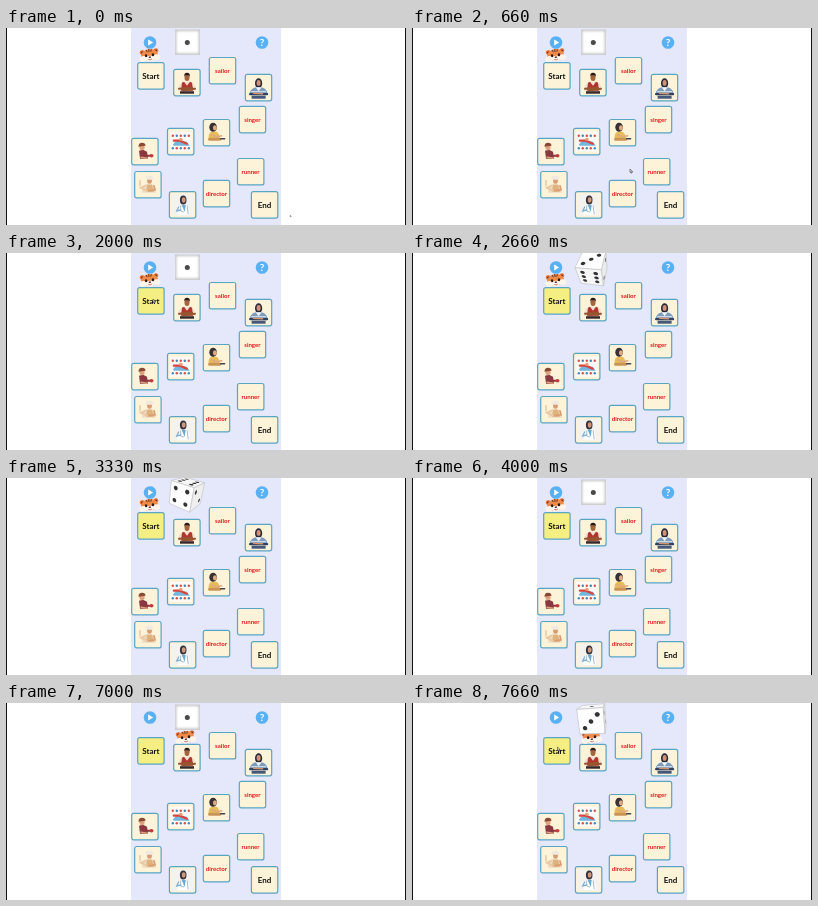
Write an HTML page that moves like this. It is 400x197 px and loops after 8 s.

```html
<!DOCTYPE html>
<html lang="en">
<head>
<meta charset="utf-8">
<title>Jobs board game</title>
<style>
html, body { margin: 0; width: 100%; height: 100%; overflow: hidden; background: #fff; }
svg { display: block; width: 400px; height: 197px; }
text { font: 700 6.1px Lato, sans-serif; text-anchor: middle; fill: #e3181c; }
text.big { font-size: 8px; fill: #111; }
</style>
</head>
<body>
<svg viewBox="0 0 400 197">
  <defs>
    <filter id="soft" x="-20%" y="-20%" width="140%" height="140%"><feGaussianBlur stdDeviation=".8"/></filter>
  </defs>
  <path d="M0 0h1v197h-1zM399 0h1v197h-1z" fill="#111"/>
  <rect x="125" width="150" height="197" fill="#e5e7fb"/>
  <g fill="#58b0f5"><circle cx="144" cy="14.5" r="6.3"/><circle cx="256" cy="14.5" r="6.3"/></g>
  <path d="M142.2 11.6l5 2.9-5 2.9z" fill="#fff"/>
  <text class="big" x="256" y="18" style="font-size:10px;fill:#fff">?</text>
  <g id="board"></g>
  <g id="tiger"></g>
  <g id="restDie">
    <rect x="169" y="1.5" width="25" height="25.5" fill="#c8c8c8"/>
    <rect x="170.5" y="3.2" width="22" height="22" fill="#fff" filter="url(#soft)"/>
    <circle cx="181.3" cy="14.4" r="2.5" fill="#4a4a4a"/>
  </g>
  <g id="rollingDie" stroke-linejoin="round"></g>
  <path id="cursor" d="M0 0v5l1.2-1 .9 2 .9-.4-.8-1.9h1.6z" fill="#fff" stroke="#111" stroke-width=".7"/>
</svg>
<script>
const $ = id => document.getElementById(id);
const oval = (x, y, rx, ry, fill) => `<ellipse cx="${x}" cy="${y}" rx="${rx}" ry="${ry}" fill="${fill}"/>`;
const shape = (d, fill) => `<path d="${d}" fill="${fill}"/>`;
const line = (d, color, width = 1) =>
  `<path d="${d}" fill="none" stroke="${color}" stroke-width="${width}" stroke-linecap="round"/>`;
const word = (label, big) => `<text class="${big ? 'big' : ''}" x="13.8" y="${big ? 17 : 16.2}">${label}</text>`;

const waiter =
  shape('M5 22q0-8 6-9h6q6 1 6 9z', '#f0e2d2') +
  shape('M9 14l2-1 3 4 3-4 2 1 1 8H8z', '#b2362e') +
  oval(14, 8.8, 2.5, 3.6, '#a4643d') + shape('M11.3 8q-.5-4 2.7-4t3 4l-1-1.5h-4z', '#2b1b18') +
  line('M6 20l13-1M22 20l-12 1.5', '#96552f', 2) + shape('M7 22.5h14v2.5H7z', '#37282b');

const sailor =
  oval(14, 9.5, 3.6, 5, '#2a2b38') + oval(14, 9.2, 2, 2.9, '#cf9370') +
  shape('M5 21q0-6 6-7.5h6q6 1.500 6 7.5z', '#7d9cbc') + shape('M11 13.500h6l-3 4z', '#f0f3f8') +
  line('M7 18h14', '#dde8f3') + line('M5.5 20.500h17', '#33435f', 2.2) +
  line('M9 19.500l9 .5', '#cf9370', 1.4) + shape('M7 22h14v3H7z', '#46587a');

const guitarist =
  oval(10.5, 8.5, 3.8, 4.6, '#383035') + oval(12.3, 9, 2, 2.6, '#dfa982') +
  shape('M6 20q-.5-7 4-7h4q3 2 3 7z', '#e8bd58') + line('M7 20.500h10', '#c99455', 3) +
  line('M9 16l5 2 5-1', '#dfa982', 1.6) + line('M18 20h4', '#42454f', 1.5);

const swimmers =
  shape('M3 4h22v20H3z', '#fdfaf6') +
  [5, 9, 13, 17, 21].map((x, i) => oval(x + 1, 8, 1.2, 1.2, i % 2 ? '#457eb0' : '#d95145') +
    oval(x + 1, 20.500, 1.2, 1.3, i % 2 ? '#db5045' : '#4a89b9')).join('') +
  shape('M6 17q4-6 8-4l6 1 3 4H7z', '#74b6dc') + line('M7 13l6 0 7 3', '#d7463c', 2.2) +
  oval(14, 11.5, 1.8, 1.5, '#e8a176');

const painter =
  shape('M8 13l4-1 4 2 1 7H9z', '#8c3840') + oval(11, 9.5, 2.6, 3, '#e0a27c') +
  shape('M7.500 9q0-4 3.500-4 3.500 0 3.500 3l-4 .5z', '#8a4934') + line('M12 14l4 4 4 0', '#8c3840', 2) +
  oval(20.500, 18, 2, 1.8, '#c63a3a') + line('M10 19.500l6 1', '#e0a27c', 1.5);

const baker =
  shape('M8 22q0-8 5-9h4q5 2 5 9z', '#ecdcc4') + oval(15.500, 10, 2.4, 3, '#d99b70') +
  shape('M12 9q-2-4 3-4 5-1 4 4z', '#f0e9df') + shape('M13 14h5l2 7h-8z', '#dfb27e') +
  line('M11 15l-4 2 6 3', '#ecc9a4', 2) + line('M20 15l1 4-6 1', '#d99b70', 1.6) +
  line('M6 10v5', '#e6c9a8', 1.5);

const doctor =
  shape('M3 3.500h21.500v21H3z', '#f3f2ef') + oval(14.500, 9, 3.3, 4.6, '#33323c') +
  oval(15, 9, 1.9, 2.8, '#d09676') + shape('M9 24q-.5-9 4-10h4q4.500 2 4 10z', '#fff') +
  shape('M13 14h4l-1 7z', '#6ba9cf') + line('M12 15l0 5 3 1M18.500 15l1 8', '#91a9bd', .8) +
  line('M10 16l-2 4 4-1', '#7fb0d2', 1.3);

const tiles = [
  [131, 34, word('Start', true)], [167, 40.7, waiter], [202.600, 28.800, word('sailor')],
  [238.600, 45.700, sailor], [232.600, 77.700, word('singer')], [196.600, 90.800, guitarist],
  [160.800, 99.700, swimmers], [125, 109.700, painter], [128, 142.800, baker],
  [162.700, 163, doctor], [196.600, 151.700, word('director')], [230.800, 129.800, word('runner')],
  [244.700, 163, word('End', true)]
];
$('board').innerHTML = tiles.map(([x, y, content]) => `<g transform="translate(${x} ${y})">
  <rect x=".7" y=".7" width="26.4" height="26.4" rx="2" fill="#fdf3d8" stroke="#58a5c4" stroke-width="1.200"/>
  ${content}</g>`).join('');
const startTile = $('board').querySelector('rect');

$('tiger').innerHTML =
  oval(-7, -3.500, 2.4, 2.4, '#e8743a') + oval(7, -3.500, 2.4, 2.4, '#e8743a') +
  oval(-7, -3.500, 1.1, 1.1, '#6a3026') + oval(7, -3.500, 1.1, 1.1, '#6a3026') +
  oval(0, 0, 8.500, 6, '#f08a48') + oval(-6.500, 3, 4, 2.8, '#fff4e8') + oval(6.500, 3, 4, 2.8, '#fff4e8') +
  oval(0, 3.600, 4, 2.800, '#fffaf2') +
  line('M0-5.500v2M-2.500-5l.6 1.500M2.500-5l-.6 1.500', '#5d3022', .9) +
  oval(-3.500, .2, 1.200, 1.500, '#2a1a18') + oval(3.500, .2, 1.200, 1.500, '#2a1a18') +
  oval(0, 2.200, 1.200, .8, '#51262a') + line('M-1.500 4.500q1.500 1.200 3 0', '#c4574c', .8);

// Each face: pip count, outward normal, two in-plane axes.
const faces = [
  [1, [0, 0, 1], [1, 0, 0], [0, 1, 0]], [6, [0, 0, -1], [1, 0, 0], [0, 1, 0]],
  [3, [0, 1, 0], [1, 0, 0], [0, 0, 1]], [4, [0, -1, 0], [1, 0, 0], [0, 0, 1]],
  [2, [1, 0, 0], [0, 1, 0], [0, 0, 1]], [5, [-1, 0, 0], [0, 1, 0], [0, 0, 1]]
];
const pips = n => [
  ...(n % 2 ? [[0, 0]] : []),
  ...(n > 1 ? [[-.52, -.52], [.52, .52]] : []),
  ...(n > 3 ? [[.52, -.52], [-.52, .52]] : []),
  ...(n > 5 ? [[-.52, 0], [.52, 0]] : [])
];
const turn = (p, q, degrees) => {
  const c = Math.cos(degrees * Math.PI / 180), s = Math.sin(degrees * Math.PI / 180);
  return [p * c - q * s, p * s + q * c];
};

function drawDie(k) {
  const rotate = ([x, y, z]) => {
    [y, z] = turn(y, z, 75 + 57 * k);
    [z, x] = turn(z, x, -10 - 5 * k);
    [x, y] = turn(x, y, -3 + 7.5 * k);
    return [x, y, z];
  };
  const project = p => {
    const [x, y, z] = rotate(p), scale = 11.8 * 9 / (9 - z);
    return `${(181 + x * scale).toFixed(2)} ${(15 + y * scale).toFixed(2)}`;
  };
  const outline = points => 'M' + points.map(project).join('L') + 'z';
  $('rollingDie').innerHTML = faces.map(([count, n, u, v]) => {
    const [nx, ny, nz] = rotate(n);
    if (nz < .12) return '';
    const at = (a, b) => n.map((c, i) => c + u[i] * a + v[i] * b);
    const gray = Math.min(255, Math.round(236 + 20 * nz - 5 * ny - 5 * nx));
    const dots = pips(count).map(([a, b]) => shape(outline(Array.from({ length: 14 }, (_, i) =>
      at(a + .18 * Math.cos(i * Math.PI / 7), b + .18 * Math.sin(i * Math.PI / 7)))), '#333'));
    return `<path d="${outline([at(-1, -1), at(1, -1), at(1, 1), at(-1, 1)])}"
      fill="rgb(${gray},${gray},${gray})" stroke="#c5c5c9" stroke-width=".7"/>` + dots.join('');
  }).join('');
}

const cursorPath = [[284, 187], [269, 185], [218, 141], [149, 51], [148, 49], [147, 48], [147, 46]];
let shown = -1;

function render(now) {
  // The picture advances three times a second.
  const step = Math.floor((now % 8000 + 7) * 3 / 1000) % 24;
  if (step !== shown) {
    shown = step;
    const roll = step >= 23 ? step - 23 : step - 7;
    const rolling = roll >= 0 && roll < 4;
    const moved = step >= 13;
    const [x, y] = step < 7 ? cursorPath[step] : [145.5, 44];
    const idle = step >= 7 && step < 22;
    startTile.setAttribute('fill', step >= 3 ? '#f5ef83' : '#fdf3d8');
    $('tiger').setAttribute('transform', `translate(${moved ? '179.5 34' : '143.5 27'}) rotate(-8)`);
    $('restDie').style.display = rolling ? 'none' : '';
    $('rollingDie').style.display = rolling ? '' : 'none';
    $('cursor').style.display = idle ? 'none' : '';
    $('cursor').setAttribute('transform', `translate(${x} ${y}) scale(${step ? .7 : .35})`);
    if (rolling) drawDie(roll);
  }
  requestAnimationFrame(render);
}
render(performance.now());
</script>
</body>
</html>
```
